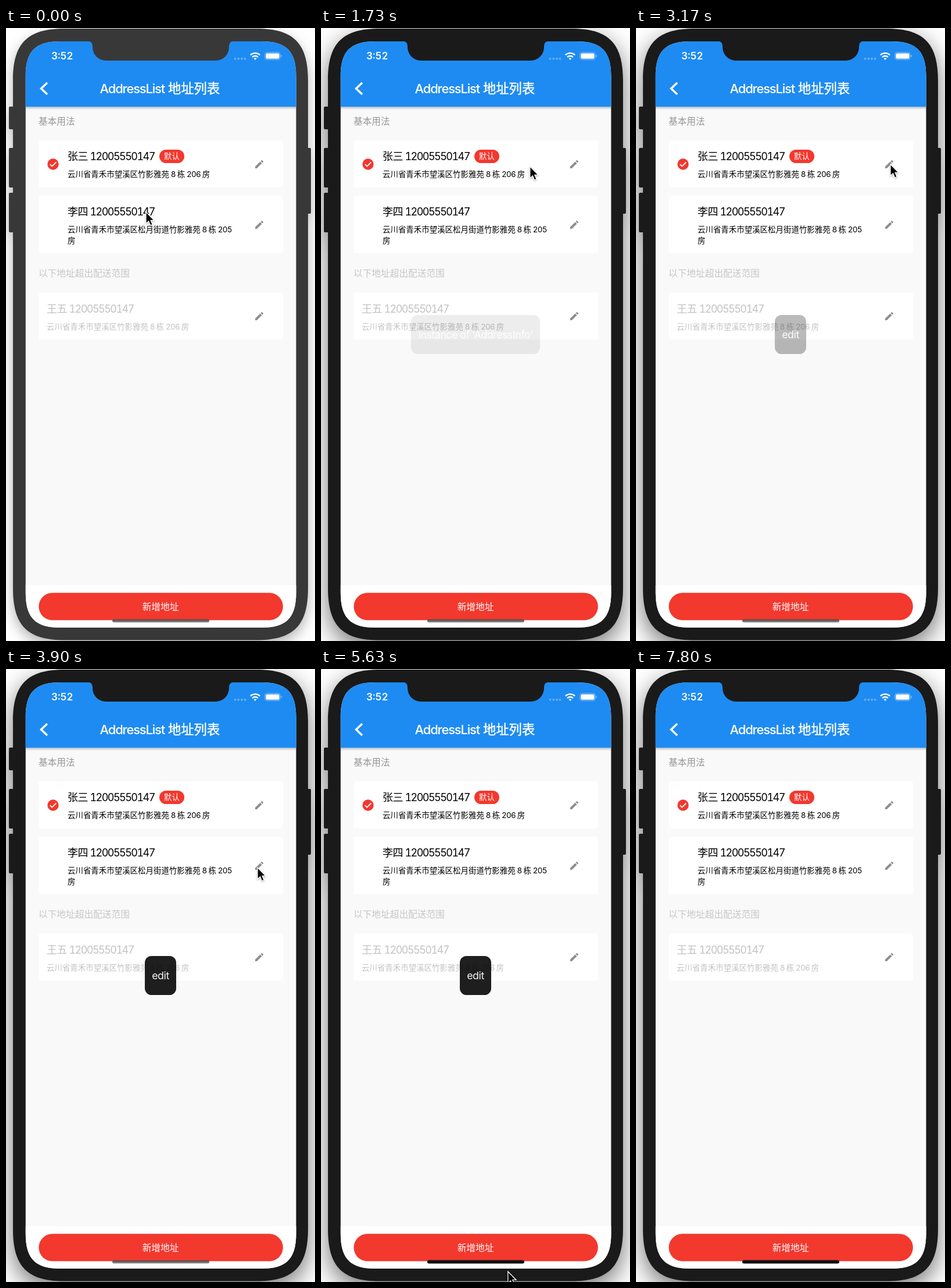
An HTML page for the animation above (7830 ms loop, 532 by 1053 pixels).

```html
<!DOCTYPE html>
<html lang="zh-CN">
<head>
<meta charset="utf-8">
<style>
html, body { margin: 0; width: 100%; height: 100%; overflow: hidden; background: #fff; }
svg { display: block; width: 532px; height: 1053px; }
text { font-family: Inter, "Noto Sans CJK SC", "Noto Sans CJK", sans-serif; font-variant-numeric: tabular-nums; white-space: pre; }
.latin { letter-spacing: var(--track, -.055em); }
.name { letter-spacing: -.4px; --track: -.086em; }
#body { fill: #1a1a1a; filter: drop-shadow(0 14px 20px rgba(0, 0, 0, .55)); }
#notch { fill: #1a1a1a; }
.idle #body { fill: #383838; filter: drop-shadow(0 9px 11px rgba(0, 0, 0, .3)); }
.idle #notch { fill: #383838; }
</style>
</head>
<body>
<svg id="stage" viewBox="0 0 532 1053"></svg>
<script>
const LOOP = 7830, RED = '#f3382e';
const PHONE = '12005550147';
const CITY = '云川省青禾市望溪区';

// Latin runs are set slightly tighter than the Chinese ones.
const text = (x, y, size, fill, str, attrs = '') =>
  `<text x="${x}" y="${y}" font-size="${size}" fill="${fill}" ${attrs}>` +
  str.replace(/[ -~]+/g, run => `<tspan class="latin">${run}</tspan>`) + '</text>';
const rect = (x, y, w, h, r, fill, attrs = '') =>
  `<rect x="${x}" y="${y}" width="${w}" height="${h}" rx="${r}" fill="${fill}" ${attrs}/>`;
const middle = 'text-anchor="middle"';

// Rounded rectangle with continuous-curvature corners
function smoothRect(x, y, w, h, r) {
  const a = 1.28 * r, c = .353 * r, k = a - c;
  return `<path d="M${x + a} ${y}h${w - 2 * a}c${k} 0 ${a} ${c} ${a} ${a}v${h - 2 * a}c0 ${k} ${-c} ${a} ${-a} ${a}
    h${2 * a - w}c${-k} 0 ${-a} ${-c} ${-a} ${-a}v${2 * a - h}c0 ${-k} ${c} ${-a} ${a} ${-a}z"/>`;
}

const pencil = y => `<path transform="translate(436 ${y}) scale(.78) translate(-12 -12)" fill="#8e8e8e"
  d="M3 17.25V21h3.75L17.81 9.94l-3.75-3.75zM20.71 7.04a1 1 0 0 0 0-1.41l-2.34-2.34a1 1 0 0 0-1.41 0l-1.83 1.83 3.75 3.75z"/>`;

const check = (id, y) => `<g id="${id}" transform="translate(81 ${y})"><circle r="9.7" fill="${RED}"/>
  <path d="M-5.2 .2L-1.8 3.6L5.3-3.5" fill="none" stroke="#fff" stroke-width="1.8"/></g>`;

const card = (x, y, h, name, lines, nameColor, lineColor) =>
  rect(56.4, y, 420.5, h, 4, '#fff') +
  text(x, y + 34, 18, nameColor, `${name} ${PHONE}`, 'class="name"') +
  lines.map((line, i) => text(x, y + 63 + i * 19, 13.46, lineColor, line)).join('');

stage.innerHTML = `
<defs>
  <clipPath id="screen">${smoothRect(33.8, 23, 465.7, 1007, 47)}</clipPath>
  <clipPath id="button">${rect(56.4, 970.3, 420.5, 47, 23.5, '#000')}</clipPath>
  <linearGradient id="shade" x2="0" y2="1">
    <stop stop-color="#000" stop-opacity=".22"/><stop offset="1" stop-color="#000" stop-opacity="0"/>
  </linearGradient>
  <linearGradient id="bar" x2="0" y2="1">
    <stop stop-color="#7a4844"/><stop offset=".4" stop-color="#5c5555"/><stop offset="1" stop-color="#a0a0a0"/>
  </linearGradient>
</defs>
<g id="body">
  ${[[5, 135, 39], [5, 206, 68], [5, 283, 68], [515, 206, 113]].map(([x, y, h]) => rect(x, y, 10, h, 2, 'inherit', 'style="fill:inherit"')).join('')}
  ${smoothRect(12, 1, 508, 1050.5, 70)}
</g>
<g clip-path="url(#screen)">
  ${rect(33, 23, 467, 1007, 0, '#f9f9f9')}
  ${rect(33, 135.4, 467, 5, 0, 'url(#shade)')}
  ${rect(33, 23, 467, 112.4, 0, '#1e8bf2')}
  ${rect(33, 957, 467, 73, 0, '#fff')}
  <path d="M71 94L60.500 104L71 114" fill="none" stroke="#fff" stroke-width="3.5"/>
  <text x="273" y="111.500" font-size="22" fill="#fff" font-weight="500" text-anchor="end" letter-spacing="-1.200">AddressList</text>
  ${text(279, 112, 22.3, '#fff', '地址列表', 'stroke="#fff" stroke-width=".45"')}
  ${text(78, 54.3, 17, '#fff', '3:52', 'font-weight="600" style="--track:0"')}
  ${[394.5, 400.3, 405.9, 411.5].map(x => `<circle cx="${x}" cy="52.700" r="2" fill="#fff" opacity=".3"/>`).join('')}
  <g fill="none" stroke="#fff" stroke-width="2.4">
    <path d="M420.800 46.400a11.800 11.800 0 0 1 16.400 0M424 50a7.200 7.200 0 0 1 10 0"/>
    <path d="M426.500 52.300q2.500-2 5 0L429 55z" fill="#fff" stroke="none"/>
  </g>
  ${rect(445.8, 41.8, 26.4, 12.6, 3.8, 'none', 'stroke="#fff" stroke-opacity=".45"')}
  ${rect(447.4, 43.4, 23.2, 9.4, 2.4, '#fff')}
  <path d="M473.500 46v4.200q1.500-.600 1.500-2.100t-1.500-2.100" fill="#fff" opacity=".5"/>

  ${text(56, 166, 15.7, '#969696', '基本用法')}
  ${card(106, 193, 81, '张三', [CITY + '竹影雅苑 8 栋 206 房'], '#000', '#000')}
  ${rect(264, 209, 43, 23, 11.5, RED)}
  ${text(285.5, 225.4, 13.4, '#fff', '默认', middle)}
  ${card(106, 288, 99, '李四', [CITY + '松月街道竹影雅苑 8 栋 205', '房'], '#000', '#000')}
  ${text(56, 427, 15.7, '#c6c6c6', '以下地址超出配送范围')}
  ${card(70, 454.6, 80.6, '王五', [CITY + '竹影雅苑 8 栋 206 房'], '#c3c3c3', '#c3c3c3')}
  ${check('first', 234)}${check('second', 338)}
  <circle id="inkA" cx="436" cy="234" fill="#203030"/>
  <circle id="inkB" cx="436" cy="338" fill="#203030"/>
  ${[234, 338, 495].map(pencil).join('')}

  <g clip-path="url(#button)">
    ${rect(56, 970, 421, 48, 0, RED)}
    <g id="press">${rect(56, 970, 421, 48, 0, '#bbb', 'opacity=".05"')}
      <circle id="inkC" cx="315.500" cy="993" fill="#bbb" opacity=".26"/></g>
  </g>
  ${text(266, 999.6, 15.7, '#fff', '新增地址', middle)}
  ${rect(183, 1015.4, 167, 5.8, 2.9, 'url(#bar)')}
  ${rect(183, 1015.4, 167, 5.8, 2.9, '#111', 'id="homeBar"')}
  <g id="toast">
    <rect id="toastBox" y="493" height="67" rx="11.500" opacity=".88"/>
    <text id="toastText" x="266" y="533" font-size="17.8" fill="#f4f4f4" text-anchor="middle" letter-spacing="-.45"></text>
  </g>
</g>
<path id="notch" d="M141 22.500Q149 23 149 31V33a23 23 0 0 0 23 23H361a23 23 0 0 0 23-23V31Q384 23 392 22.500z"/>
<path id="cursor" d="M0 0V20L4.600 15.900L7.700 23.200L11.200 21.700L8.100 14.500H14.200z" stroke="#fff" stroke-width="1.3"
  style="filter:drop-shadow(0 1.500px 1.500px rgba(0,0,0,.35))"/>`;

const $ = id => document.getElementById(id);
const set = (id, attrs) => { for (const k in attrs) $(id).setAttribute(k, attrs[k]); };
const ramp = (t, from, to) => Math.min(1, Math.max(0, (t - from) / (to - from)));

// Pointer stops: time, x, y
const PATH = [
  [0, 241, 316], [500, 241, 316], [980, 338, 239], [1550, 338, 239], [2150, 438, 234],
  [3300, 438, 234], [3850, 433, 341], [4850, 433, 341], [5400, 322, 1042], [5600, 322, 1036],
  [5950, 316, 988], [6430, 316, 988], [6950, 545, 930], [LOOP, 545, 930]
];
function pointerAt(t) {
  const i = PATH.findIndex(stop => stop[0] > t);
  const [t0, x0, y0] = PATH[i - 1], [t1, x1, y1] = PATH[i];
  const p = ramp(t, t0, t1), e = p * p * (3 - 2 * p);
  return [x0 + (x1 - x0) * e, y0 + (y1 - y0) * e];
}

// Toasts wait in a queue: start, message, box width
const INFO = "Instance of 'AddressInfo'";
const TOASTS = [[320, INFO, 222], [1715, INFO, 222], [3110, 'edit', 54], [4505, 'edit', 54], [6145, 'add', 54]];
function drawToast(t) {
  const [start, message, width] = TOASTS.findLast(item => item[0] <= t) || [LOOP, '', 54];
  const age = t - start;
  set('toast', { opacity: ramp(age, 0, 200) * (1 - ramp(age, 1200, 1395)) });
  set('toastBox', { x: 266 - width / 2, width });
  if ($('toastText').textContent !== message) $('toastText').textContent = message;
}

function drawIconInk(id, t, start) {
  const age = t - start;
  set(id, { r: 12 + 26 * ramp(age, 0, 130), opacity: .025 * ramp(age, 0, 60) * (1 - ramp(age, 180, 420)) });
}

function draw(t) {
  stage.classList.toggle('idle', t < 200);
  const second = t >= 300 && t < 1300;
  set('first', { opacity: second ? 0 : 1 });
  set('second', { opacity: second ? 1 : 0 });
  drawIconInk('inkA', t, 2330);
  drawIconInk('inkB', t, 4050);
  set('inkC', { r: 12 + 86 * Math.max(0, t - 6050) / 220 });
  set('press', { opacity: ramp(t, 6050, 6120) * (1 - ramp(t, 6290, 6560)) });
  set('homeBar', { opacity: ramp(t, 5250, 5500) });
  drawToast(t);
  set('cursor', { transform: `translate(${pointerAt(t)})` });
}

function frame() {
  draw(performance.now() % LOOP);
  requestAnimationFrame(frame);
}
frame();
</script>
</body>
</html>
```
